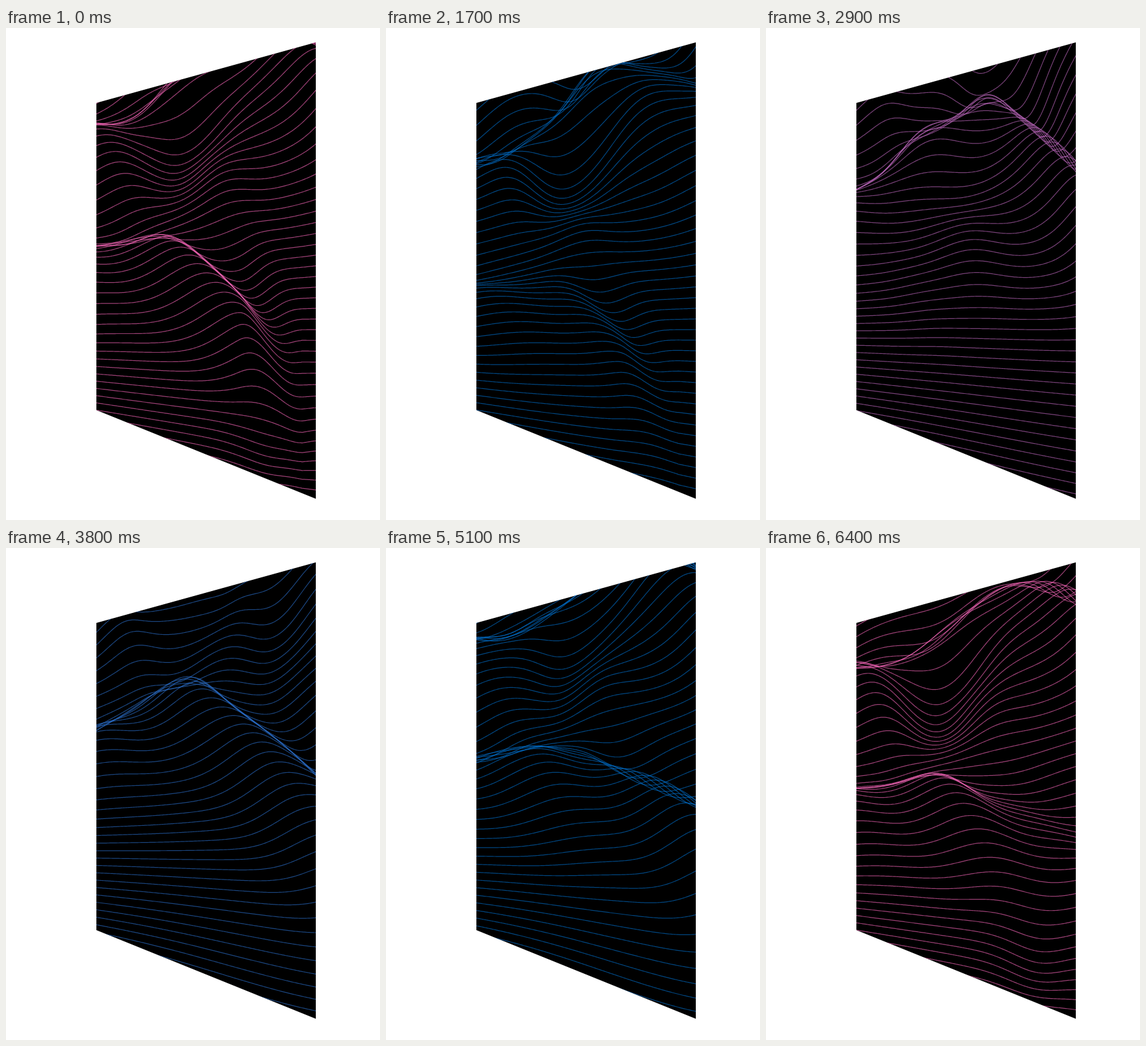
These frames come from a looping animation (600 by 788 pixels, 6.5 s). An HTML page with a canvas:

```html
<!DOCTYPE html>
<html lang="en">
<head>
<meta charset="utf-8">
<title>Line waves</title>
<style>
  html, body { margin: 0; width: 100%; height: 100%; overflow: hidden; background: #fff; }
  canvas { display: block; width: 600px; height: 788px; }
</style>
</head>
<body>
<canvas id="stage" width="600" height="788"></canvas>
<script>
const ctx = document.getElementById('stage').getContext('2d');
const LOOP = 6500, STEP = 100, CYCLE = 5.4;
const LEFT = 145, RIGHT = 497, DX = 2;
const BLUE = [0, 115, 210], PINK = [255, 105, 190];

const mix = (a, b, k) => a + (b - a) * k;
const bell = d => Math.exp(-d * d / 2);
const wave = turns => Math.sin(turns * 2 * Math.PI);
function smooth(from, to, v) {
  const k = Math.min(1, Math.max(0, (v - from) / (to - from)));
  return k * k * (3 - 2 * k);
}

// Times in seconds; u runs from 0 at the left edge of the panel to 1 at the right.
const sinking = age => 155 + 36 * age;

// A crest sinks steadily while its right end swings from high to low.
function crestY(u, age, fall) {
  const turned = smooth(2, 4, age);
  const hump = 30 + 62 * bell((age - 3.2) / .8);
  return sinking(age)
    + mix(-110, 75, turned) * u
    - hump * Math.sin(Math.PI * u)
    + 30 * (1 - turned) * wave(u)
    + fall * u ** 3;
}

function crest(u, age, fall) {
  const y = crestY(u, age, fall);
  const fade = 1 - smooth(6.2, 8.2, age);
  const rightFade = 1 - .65 * smooth(5.1, 6.4, age) * smooth(.4, 1, u);
  const steepFade = fall ? 1 - smooth(.65, .95, u) : 1;
  return { y, force: 1.3 * fade * rightFade * steepFade };
}

// A weaker strand hangs below the middle of a young crest.
function strand(u, age) {
  return {
    y: crestY(u, age, 0) + 150 * Math.sin(Math.PI * u),
    force: .75 * bell((u - .45) / .2) * (1 - smooth(2.6, 3.8, age))
  };
}

// A trough pushes the lines down around one spot.
function trough(x, y, depth, width, height, at) {
  return { y, height, depth: depth * bell((at - x) / width) };
}

function troughs(x, age) {
  return [
    trough(285, sinking(age) + 25, 72 * bell((age - .8) / 1.1), 58, 60, x),
    trough(272 + 42 * age, 75 + 8 * age, 62 * bell((age - 3) / .9), 52, 65, x)
  ];
}

function sags(x, t) {
  const late = smooth(5.1, 6.4, t);
  const wide = smooth(2.3, 4.8, t) * (1 - late);
  const tight = late + 1 - smooth(0, 1.7, t);
  return [
    trough(RIGHT, 715, 58 * wide, 190, 90, x),
    trough(438, 645, 22 * tight, 42, 55, x)
  ];
}

function column(x, t) {
  const u = Math.min(1, (x - LEFT) / (RIGHT - LEFT));
  const ages = [t + CYCLE, t, t - CYCLE];
  return {
    x, u,
    spread: mix(44, 66, u),
    dips: [...ages.flatMap(age => troughs(x, age)), ...sags(x, t)],
    pulls: ages.flatMap(age => [crest(u, age, age > t ? 200 : 0), strand(u, age)])
      .filter(p => p.force > .01)
  };
}

function lineY(n, t, { x, u, spread, dips, pulls }) {
  const base = mix(612 - 11.55 * n, 670 - 17 * n, u);
  let rest = base;
  for (const d of dips) rest += d.depth * bell((base - d.y) / d.height);
  const twist = 1 + .2 * Math.sin(x / 30 + n * .3 - t);
  let y = rest;
  for (const p of pulls) {
    const d = rest - p.y;
    y -= p.force * twist * d * bell(d / (spread * (d > 0 ? 1.25 : .8)));
  }
  const ripple = 3 * smooth(540, 200, base) * Math.sin(Math.PI * u);
  return y + ripple * Math.sin(x / 34 + n * .3 + t);
}

function tracePanel() {
  ctx.beginPath();
  ctx.moveTo(LEFT, 120);
  ctx.lineTo(RIGHT, 23);
  ctx.lineTo(RIGHT, 754);
  ctx.lineTo(LEFT, 612);
  ctx.closePath();
}

function lineColor(t) {
  const pink = smooth(.3, 1, Math.cos(t * 4 * Math.PI / (LOOP / 1000)));
  return `rgb(${BLUE.map((v, i) => Math.round(mix(v, PINK[i], pink)))})`;
}

function draw(t) {
  const columns = [];
  for (let x = LEFT; x <= RIGHT + DX; x += DX) columns.push(column(x, t));

  ctx.clearRect(0, 0, 600, 788);
  ctx.save();
  tracePanel();
  ctx.fillStyle = '#000';
  ctx.fill();
  ctx.clip();
  ctx.strokeStyle = lineColor(t);
  ctx.globalAlpha = .62;
  ctx.lineWidth = 1.2;
  ctx.lineJoin = 'round';
  for (let n = -9; n < 56; n++) {
    ctx.beginPath();
    for (const c of columns) ctx.lineTo(c.x, lineY(n, t, c));
    ctx.stroke();
  }
  ctx.restore();
}

let shown = -1;
function frame() {
  const time = Math.floor(performance.now() / STEP) * STEP % LOOP;
  if (time !== shown) draw((shown = time) / 1000);
  requestAnimationFrame(frame);
}
frame();
</script>
</body>
</html>
```
